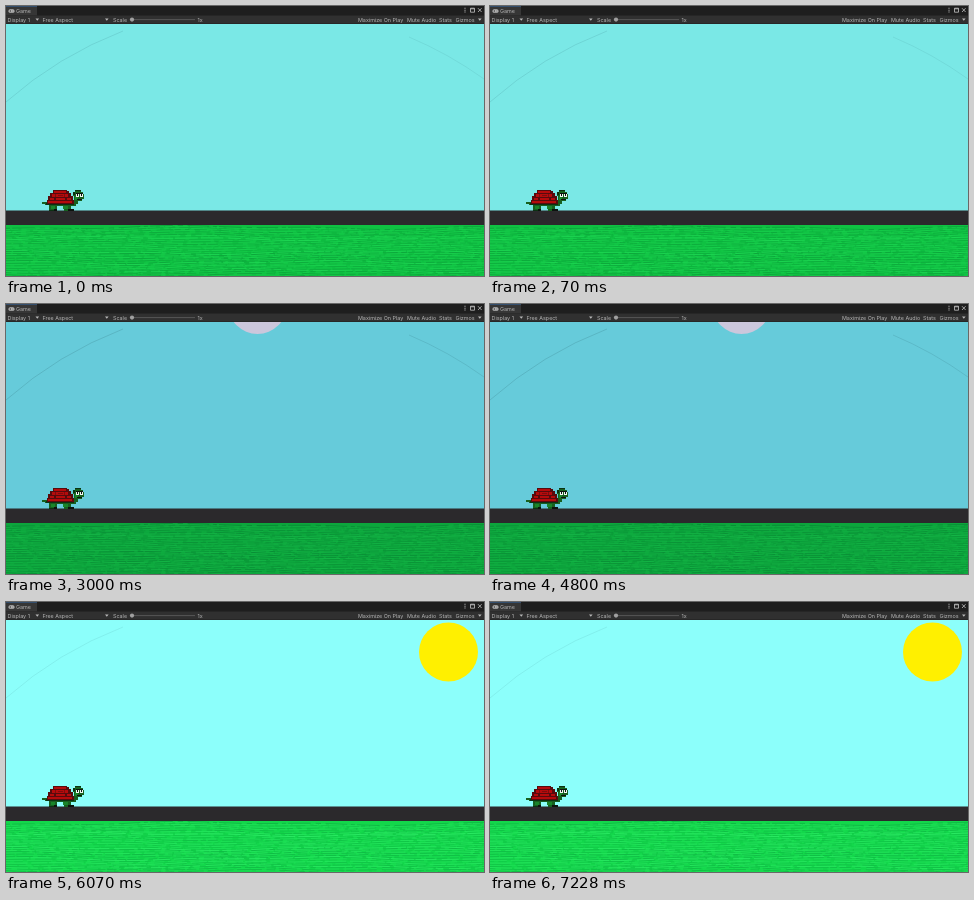
An HTML page that plays this animation: 478x270 px, repeating every 8 s.

```html
<!DOCTYPE html>
<html lang="en">
<head>
<meta charset="utf-8">
<title>Day cycle</title>
<style>
html, body { margin: 0; width: 100%; height: 100%; overflow: hidden; background: #1b1b1b; }
svg { display: block; width: 478px; height: 270px; }
text { font: 5.4px Inter, Roboto, sans-serif; fill: #b4b4b4; }
#sky { fill: var(--sky); }
#turf { fill: var(--turf); }
#dark path { stroke: var(--shade); }
#lite path { stroke: var(--glint); }
</style>
</head>
<body>
<svg viewBox="0 0 478 270">
  <defs><clipPath id="view"><rect y="18" width="478" height="252"/></clipPath></defs>

  <g clip-path="url(#view)">
    <rect id="sky" y="18" width="478" height="187"/>
    <g fill="none" stroke="#28606a">
      <path id="arcL" d="M0 96A387 387 0 0 1 117 25"/>
      <path id="arcR" d="M403 31A387 387 0 0 1 478 73"/>
    </g>
    <circle id="moon" cx="251.5" cy=".5" r="29.5" fill="#cbc7dc"/>
    <circle id="sun" cx="442.5" cy="50" r="29.5" fill="#fff000"/>
    <rect y="204.5" width="478" height="14.5" fill="#2b292c"/>
    <rect id="turf" y="219" width="478" height="51"/>
    <g id="dark" fill="none"></g>
    <g id="lite" fill="none"></g>
  </g>

  <g id="turtle" shape-rendering="crispEdges">
    <path fill="#17601f" d="M36 196h6v-1h26v-5h-1v-4h2v-2h6v2h2v2h1v5h-2v2h-4v3h-2v2h-5v5h-7v-5h-7v5h-8v-6h-4v-1h-3z"/>
    <path fill="#0b3212" d="M40 197h28v2H40zM43 204h7v1h-7zM69 184h6v1h-6zM67 186h2v3h-2z"/>
    <path fill="#19852a" d="M45 200h4v3h-4zM57 200h5v3h-5zM69 190h3v4h-3z"/>
    <path fill="#570b0d" d="M47 184h14v1h2v2h2v3h2v4h1v4H41v-4h1v-4h2v-3h3z"/>
    <path fill="#b50b0c" d="M48 185h12v2H48zM46 188h16v3H46zM44 192h4v2h-4zM50 192h9v2h-9zM61 192h4v2h-4zM42 195h24v2H42z"/>
    <path fill="#7f0c0d" d="M49 188h1v3h-1zM58 188h1v3h-1zM52 189h5v1h-5z"/>
    <path fill="#f2f7f2" d="M70 188h3v3h-3zM74 188h3v3h-3z"/>
    <path fill="#0c120d" d="M71 188h1v2h-1zM75 188h1v2h-1zM70 187h7v1h-7zM71 193h5v1h-5zM48 203h3v2h-3zM62 203h6v2h-6z"/>
  </g>

  <g id="bar">
    <rect width="478" height="9.5" fill="#1e1e1e"/>
    <rect width="31" height="9.5" fill="#363636"/>
    <rect width="31" height=".8" fill="#34567c"/>
    <rect y="9.5" width="478" height="8.5" fill="#303030"/>
    <rect y="17.4" width="478" height=".6" fill="#222"/>
    <rect x="2.5" y="3.2" width="6" height="3.6" rx="1.6" fill="#b8b8b8"/>
    <path d="M3.6 5h1.6M4.4 4.2v1.6M6.4 5h1" stroke="#363636" stroke-width=".6"/>
    <path d="M125 13.6h64" stroke="#606060" stroke-width=".8"/>
    <circle cx="126" cy="13.6" r="2.1" fill="#a0a0a0"/>
    <path fill="#b8b8b8" d="M29.5 12.5h3.6l-1.8 2.3zM99 12.5h3.6l-1.8 2.3zM472 12.5h3.6l-1.8 2.3z"/>
    <path fill="#c4c4c4" d="M458.5 1.8h1v1h-1zM458.5 3.7h1v1h-1zM458.5 5.6h1v1h-1z"/>
    <path fill="none" stroke="#c4c4c4" stroke-width=".8" d="M464.5 2.2h4v4h-4zM464.5 2.8h4M472 2.2l3.6 3.8M475.6 2.2l-3.6 3.8"/>
  </g>
</svg>
<script>
const NS = 'http://www.w3.org/2000/svg';
const $ = id => document.getElementById(id);
const add = (parent, tag, attrs) => {
  const el = document.createElementNS(NS, tag);
  for (const k in attrs) el.setAttribute(k, attrs[k]);
  return parent.appendChild(el);
};

// Toolbar labels
[
  ['Game', 10, 7], ['Display 1', 1.5, 15.5], ['Free Aspect', 36.5, 15.5],
  ['Scale', 107, 15.5], ['1x', 191.5, 15.5], ['Maximize On Play', 352, 15.5],
  ['Mute Audio', 401, 15.5], ['Stats', 433, 15.5], ['Gizmos', 449.5, 15.5]
].forEach(([s, x, y]) => add($('bar'), 'text', { x, y }).textContent = s);

// Wavy grain in the turf
let seed = 17;
const rnd = () => (seed = (seed * 16807) % 2147483647) / 2147483647;
const grain = (x, y) =>
  y + 1.3 * Math.sin(x / 58 + y * .12) + .8 * Math.sin(x / 23 - y * .21);

function streaks(group, count, y0, gap) {
  for (let i = 0; i < count; i++) {
    const y = y0 + i * gap;
    let d = '';
    for (let x = 0; x <= 480; x += 8) d += (x ? 'L' : 'M') + x + ' ' + grain(x, y).toFixed(2);
    const dash = Array.from({ length: 8 }, (_, k) =>
      (k % 2 ? 1 + rnd() * 5 : 4 + rnd() * 22).toFixed(1)).join(' ');
    add(group, 'path', {
      d, 'stroke-width': (.5 + rnd() * .5).toFixed(2),
      'stroke-dasharray': dash, opacity: (.35 + rnd() * .45).toFixed(2)
    });
  }
}
streaks($('dark'), 25, 221.5, 2);
streaks($('lite'), 25, 222.5, 2);

const LOOP = 8000;
const scenes = [
  { at: 0, sky: '#7ae8e6', turf: '#0fc142', shade: '#0a8f35', glint: '#22dc58', arcL: .14, arcR: .1 },
  { at: 3000, sky: '#66cbda', turf: '#0ca63c', shade: '#087a31', glint: '#18ba4b', arcL: .2, arcR: .16, moon: 1 },
  { at: 6000, sky: '#8cfffb', turf: '#13d74b', shade: '#0da33f', glint: '#31ee6a', arcL: .1, arcR: 0, sun: 1 }
];

let shown;
function show(s) {
  if (s === shown) return;
  shown = s;
  for (const k of ['sky', 'turf', 'shade', 'glint'])
    document.documentElement.style.setProperty('--' + k, s[k]);
  for (const k of ['arcL', 'arcR', 'moon', 'sun']) $(k).style.opacity = s[k] || 0;
}

const start = performance.now();
function tick() {
  const t = (performance.now() - start) % LOOP;
  show(scenes.findLast(s => t >= s.at));
  requestAnimationFrame(tick);
}
tick();
</script>
</body>
</html>
```
